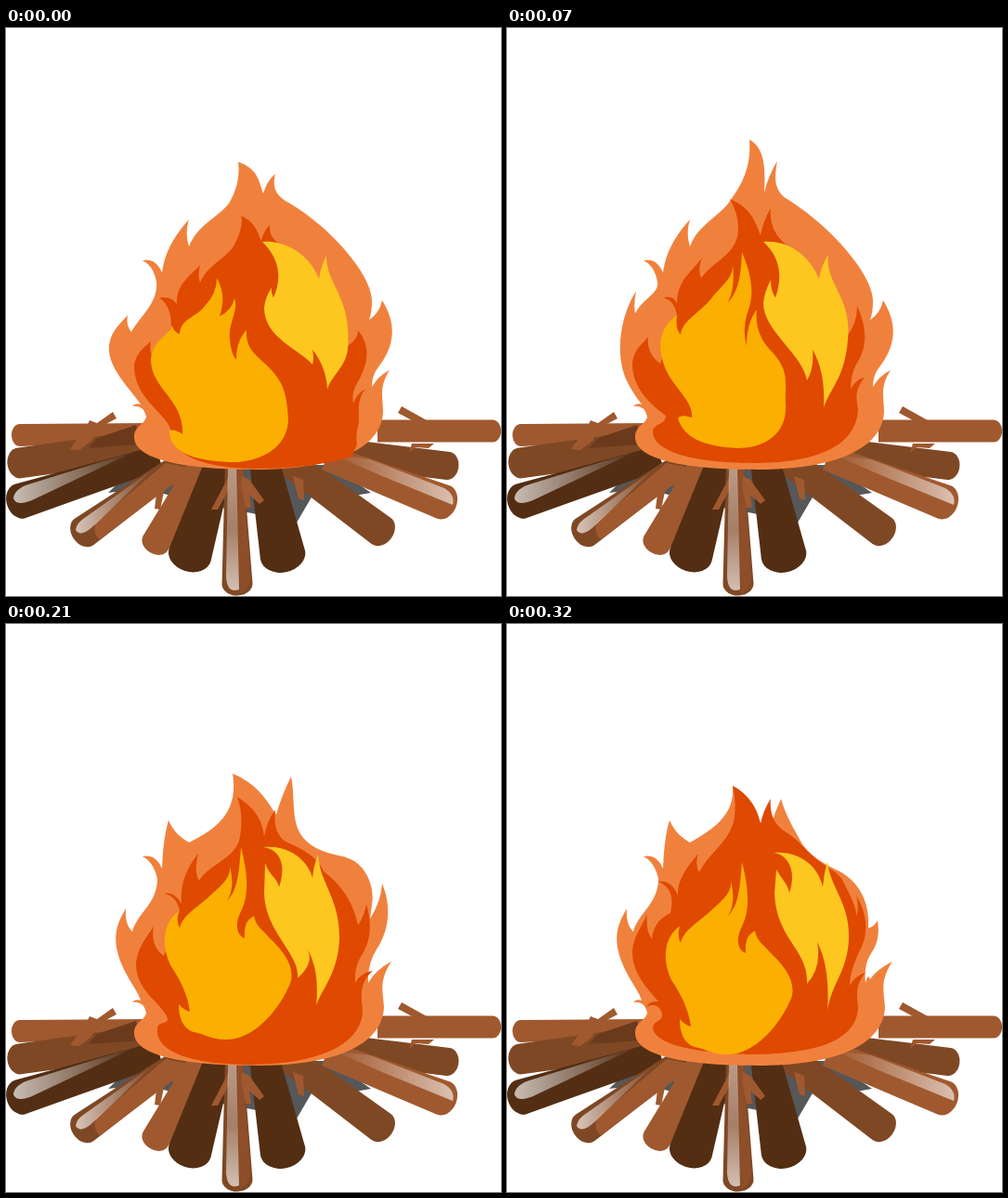
These frames come from a looping animation (533 px wide and 611 px high, 350 ms). An HTML page:

```html
<!DOCTYPE html>
<html>
<head>
<meta charset="utf-8">
<title>Campfire</title>
<style>
html, body { margin: 0; width: 100%; height: 100%; overflow: hidden; background: #fff; }
svg { display: block; width: 100%; height: 100%; }
</style>
</head>
<body>
<svg viewBox="0 0 533 611">
  <defs>
    <linearGradient id="shineLeft"><stop stop-color="#fff" stop-opacity=".68"/><stop offset="1" stop-color="#fff" stop-opacity="0"/></linearGradient>
    <linearGradient id="shineRight"><stop stop-color="#fff" stop-opacity="0"/><stop offset="1" stop-color="#fff" stop-opacity=".62"/></linearGradient>
    <linearGradient id="shineDown" x2="0" y2="1"><stop stop-color="#fff" stop-opacity=".45"/><stop offset=".5" stop-color="#fff" stop-opacity=".3"/><stop offset="1" stop-color="#fff" stop-opacity=".65"/></linearGradient>
  </defs>
  <g id="wood"></g>
  <g id="fire"></g>
</svg>
<script>
const LIGHT = '#a0592f', MID = '#7f4825', DARK = '#532e13', ASH = '#555759';
const ORANGE = '#f0813d', RED = '#df4900', AMBER = '#fbaf00', YELLOW = '#fdc71f';
const wood = document.getElementById('wood'), fire = document.getElementById('fire');
const shape = (d, fill, extra = '') => `<path d="${d}" fill="${fill}" ${extra}/>`;

// A tapered log from its thin inner end to its rounded outer end.
function log(x1, y1, w1, x2, y2, w2, color) {
  const a = Math.atan2(y2 - y1, x2 - x1), nx = -Math.sin(a) / 2, ny = Math.cos(a) / 2;
  const p = (x, y, w) => `${x + nx * w} ${y + ny * w}`;
  return shape(`M${p(x1, y1, -w1)}L${p(x2, y2, -w2)}A${w2 * .38} ${w2 / 2} ${a * 180 / Math.PI} 0 1 ${p(x2, y2, w2)}L${p(x1, y1, w1)}Z`, color);
}
const twig = d => shape(d, LIGHT);

wood.innerHTML =
  shape('M110 500L125 485L165 470H350L393 500L375 503L330 503L313 532L265 522L200 510L150 495Z', ASH) +
  log(155, 434, 18, 15, 438, 24, LIGHT) +
  log(165, 447, 34, 14, 468, 33, MID) +
  shape('M98 441L140 427L145 448L88 452Z', '#6b3a1d') +
  twig('M115 413L119 420L98 431L92 444L79 454L69 453L81 436L87 428L90 422L98 425Z') +
  log(165, 462, 26, 15, 509, 38, DARK) +
  shape('M8 506Q9 496 24 491L140 455L28 508Q11 515 8 506Z', 'url(#shineLeft)') +
  log(190, 467, 24, 84, 542, 35, MID) +
  shape('M172 468L202 474L101 550Q94 545 96 532Z', LIGHT) +
  shape('M75 540Q76 532 86 526L158 475L96 534Q81 549 75 540Z', 'url(#shineLeft)') +
  log(214, 466, 30, 161, 554, 31, LIGHT) +
  twig('M164 485L174 480L166 518L160 517Z') + twig('M179 485L187 482L188 488L183 494L175 488Z') +
  log(400, 433.5, 24, 524, 433.5, 24, LIGHT) +
  twig('M426 407L453 422H437L422 414Z') +
  log(370, 458, 30, 476, 471, 30, MID) +
  twig('M437 447L461 447L455 452L441 451L434 457Z') +
  log(300, 464, 30, 404, 541, 35, MID) +
  log(345, 462, 28, 471, 510, 38, LIGHT) +
  shape('M352 459L392 464L472 495Q484 502 481 513L405 482Z', 'url(#shineRight)') +
  twig('M309 482L320 486L321 508L315 506Z') +
  log(230, 466, 30, 198, 567, 47, DARK) +
  log(278, 466, 32, 298, 567, 49, DARK) +
  log(245.5, 466, 19, 249, 598, 33, MID) +
  shape('M246 474H255L263 590Q263 603 252 608Z', '#8d4e29') +
  twig('M240 482V496L228 518L221 518Z') + twig('M254 482L262 486L278 508L273 512L262 502L264 516H258L253 492Z') +
  shape('M239 473H248L251 604Q238 609 237 590Z', 'url(#shineDown)');

// Outline pieces shared by several poses.
const base = 'M270 475C195 475 138 465 138 440C138 428 150 426 151 418Q148 405 136 407Q139 403 145 405';
const leftLow = 'C142 393 124 375 119 348C116 330 122 318 129 306C128 318 131 326 136 331C141 311 163 301 163 274';
const curl = 'Q159 256 147 250Q161 247 168 263';
const tuft = 'C171 239 184 220 197 206C193 219 195 228 197 235';
const wideTuft = 'C169 240 171 225 175 211C180 223 188 230 197 235';
const rightDome = 'C348 212 395 266 394 295Q394 306 391 314';
const rightSide = 'Q402 307 405 293C424 323 415 347 400 366Q394 374 394 386Q401 374 413 368C401 387 406 397 406 413C404 456 345 475 270 475Z';
const redBowl = 'Q369 375 369 389Q375 378 386 375C374 390 377 399 378 413C376 450 330 462 265 463C205 462 157 453 157 433';
const lowAmber = 'M253 233C260 260 262 282 254 300C245 317 249 328 257 331C256 316 260 311 267 307C269 319 277 322 284 331C301 347 313 365 305 382C292 411 266 440 237 440C220 440 212 433 202 432C190 428 186 416 186 402Q191 408 198 410C196 393 188 376 177 360C166 337 170 313 186 302Q183 313 187 320C190 306 209 296 221 284C237 270 242 264 241 253Q247 277 238 291C250 279 251 258 253 233Z';

// One pose: outer flame, inner flame, left core, right core.
const pose = (outer, red, amber, yellow, drop = 0) =>
  `<g visibility="hidden">${shape(outer, ORANGE)}${shape(red, RED)}${shape(amber, AMBER, `transform="translate(0 ${drop})"`)}${shape(yellow, YELLOW)}</g>`;

const poses = [
  pose(
    base + 'C138 393 113 370 111 348C110 330 120 321 131 309Q129 320 135 327C145 309 164 296 162 273' + curl + tuft +
      'C207 210 232 202 241 187Q253 166 250 144C272 152 272 165 277 178Q281 164 290 157C286 173 292 180 301 186' + rightDome + rightSide,
    'M270 474C210 474 177 458 178 434C174 415 139 400 138 365C138 352 148 344 156 337Q154 346 157 352L178 322C178 309 176 298 165 290Q178 288 184 297C183 276 198 267 209 255Q206 266 209 274C216 255 241 246 247 231Q256 213 253 202C268 208 271 220 275 229Q277 218 284 212Q283 225 293 231L336 275L368 342Q379 335 379 325C396 346 387 367 376 386Q372 394 374 404Q378 393 387 388C378 400 380 410 380 425Q376 437 378 448L372 461Q330 474 270 474Z',
    'M227 269C236 286 234 297 230 310Q243 304 246 291C251 303 239 318 241 335Q242 350 248 357C248 342 252 332 259 325C258 344 267 350 280 362C300 381 302 394 304 420C304 450 276 468 240 467C202 465 176 457 176 433Q182 431 190 437C192 400 156 388 156 357C157 337 175 331 179 320Q181 328 187 329C188 312 206 311 214 299Q227 286 227 269Z',
    'M276 230C303 228 328 246 337 270Q338 259 345 245C344 275 373 290 368 345C366 365 350 374 346 389Q345 365 330 346Q332 355 330 362C315 345 278 333 278 301Q279 290 286 279Q285 285 288 290C296 272 297 251 276 230Z'),
  pose(
    base + 'C139 396 126 381 123 360C119 335 125 305 139 283Q136 298 138 307C147 290 164 286 162 273' + curl + tuft +
      'C206 211 231 201 240 186C255 166 263 147 261 120C279 130 278 155 277 177Q281 160 291 143C288 160 287 174 300 183' + rightDome + rightSide,
    'M240 184C262 193 267 207 273 223Q276 207 284 194Q282 215 296 229L337 271L366 331Q377 319 377 299C390 327 386 347 376 362Q370 373 370 389Q375 378 385 376C374 390 376 398 378 410C376 454 325 468 265 468C205 468 157 457 157 434C158 425 171 427 171 417C153 404 135 386 135 362C136 346 145 341 152 332Q150 350 165 361L183 311Q182 294 168 290Q180 287 183 297C183 270 200 262 210 247Q205 261 209 269C222 251 242 246 248 225Q252 205 240 184Z',
    'M253 241C265 270 266 288 259 306Q253 323 258 342C258 325 262 312 269 303C267 320 272 335 285 348C305 370 299 380 300 405C302 437 277 452 248 452C213 450 191 442 184 420Q187 415 199 419C201 401 178 386 170 365C160 339 166 321 183 309Q181 324 187 330C188 314 211 305 223 287C238 271 243 267 243 254Q246 279 238 295C250 283 252 263 253 241Z',
    'M276 230C308 228 328 250 336 270Q338 256 346 244C342 275 372 290 367 335C364 375 349 386 341 408Q343 370 329 346Q331 366 323 379C318 350 276 326 276 296Q277 284 284 271Q284 283 289 290C296 271 296 248 276 230Z'),
  pose(
    base + leftLow + curl + tuft +
      'C207 220 236 212 245 199L257 188Q264 170 261 152C279 162 280 177 286 187L293 204Q299 185 306 163C308 191 304 213 320 229C338 242 360 242 372 252C390 267 395 287 390 302L390 314' + rightSide,
    'M240 178C262 187 268 201 273 217Q276 199 285 187C284 205 290 218 302 223C328 234 342 249 345 264C361 273 369 290 368 324Q379 308 377 291C391 320 388 340 378 355' + redBowl +
      'C160 425 171 428 170 418C164 401 135 390 135 357C137 342 147 335 155 328Q149 345 158 360L172 364L186 305Q183 282 163 278Q174 273 183 287C182 265 190 251 207 236Q203 254 206 263C218 245 243 234 244 211Q246 195 240 178Z',
    lowAmber,
    'M276 243C303 242 333 258 340 282Q341 269 344 258C348 286 367 296 367 345C366 380 350 395 343 420Q346 377 332 346Q336 371 321 390C322 353 278 334 276 268C285 283 296 284 301 293C307 272 302 249 276 243Z'),
  pose(
    base + leftLow + curl + wideTuft +
      'C225 221 251 204 244 161C270 171 281 190 291 205Q297 184 307 164C312 190 306 212 320 230C338 250 360 246 375 255C390 265 397 285 394 302L392 317Q404 298 405 279C417 308 410 334 399 350Q389 366 390 386Q398 372 415 363C401 384 406 396 407 412C405 457 345 475 270 475Z',
    'M249 186C268 198 276 211 278 229Q281 211 290 200Q287 225 301 234C322 243 336 252 342 266C360 280 374 298 379 324Q386 314 388 301C396 329 390 346 382 358Q375 369 376 386Q382 375 395 373C381 385 382 399 384 416C383 455 330 474 262 474C202 474 160 461 163 435C164 426 175 432 174 424C168 408 140 395 140 366C142 346 152 337 159 325Q155 347 170 357L187 308Q183 292 170 290Q181 287 189 301C187 279 195 262 207 247Q202 267 208 276C220 257 249 252 252 228Q256 206 249 186Z',
    lowAmber,
    'M277 240C306 237 325 255 330 273Q331 260 336 248C338 280 360 295 359 340C357 375 342 390 334 410Q339 362 315 336C330 352 332 365 314 381C317 355 279 332 278 290L279 257C283 270 292 273 294 283C301 263 298 243 277 240Z', 7),
  pose(
    base + leftLow + curl + wideTuft +
      'C220 222 246 206 243 174L274 215L284 218Q288 203 295 188C300 206 310 222 318 237C328 251 345 260 358 266C378 277 391 298 389 327Q395 326 399 319C402 337 397 347 391 356Q384 368 386 386Q389 375 391 382Q399 371 415 363C401 384 406 396 407 412C405 457 345 475 270 475Z',
    'M243 174C262 184 270 200 273 215Q276 200 284 188C282 207 290 218 302 225C317 234 325 250 346 262Q360 270 363 279C368 290 380 308 376 326L369 329Q382 312 376 292C391 317 388 338 378 355' + redBowl +
      'C160 425 168 428 167 419Q163 406 150 412Q153 405 163 406C149 390 135 375 135 352C136 336 145 326 151 312Q149 330 156 339Q158 319 176 311Q182 285 163 277Q177 275 184 292C183 275 195 260 206 247Q202 260 207 267C218 245 243 232 245 206Q247 190 243 174Z',
    lowAmber,
    'M287 246C315 244 335 260 340 283Q341 269 345 255C348 285 370 300 368 340C366 375 350 385 345 416Q348 369 334 342Q339 370 323 387C325 350 290 340 288 290L290 264C296 275 302 279 304 289C311 270 306 249 287 246Z', 23)
];
fire.innerHTML = poses.join('');

const HOLD = 70, start = performance.now();
function draw(now) {
  const current = Math.floor(Math.max(0, now - start) / HOLD) % poses.length;
  [...fire.children].forEach((g, i) => g.setAttribute('visibility', i === current ? 'visible' : 'hidden'));
  requestAnimationFrame(draw);
}
draw(start);
</script>
</body>
</html>
```
